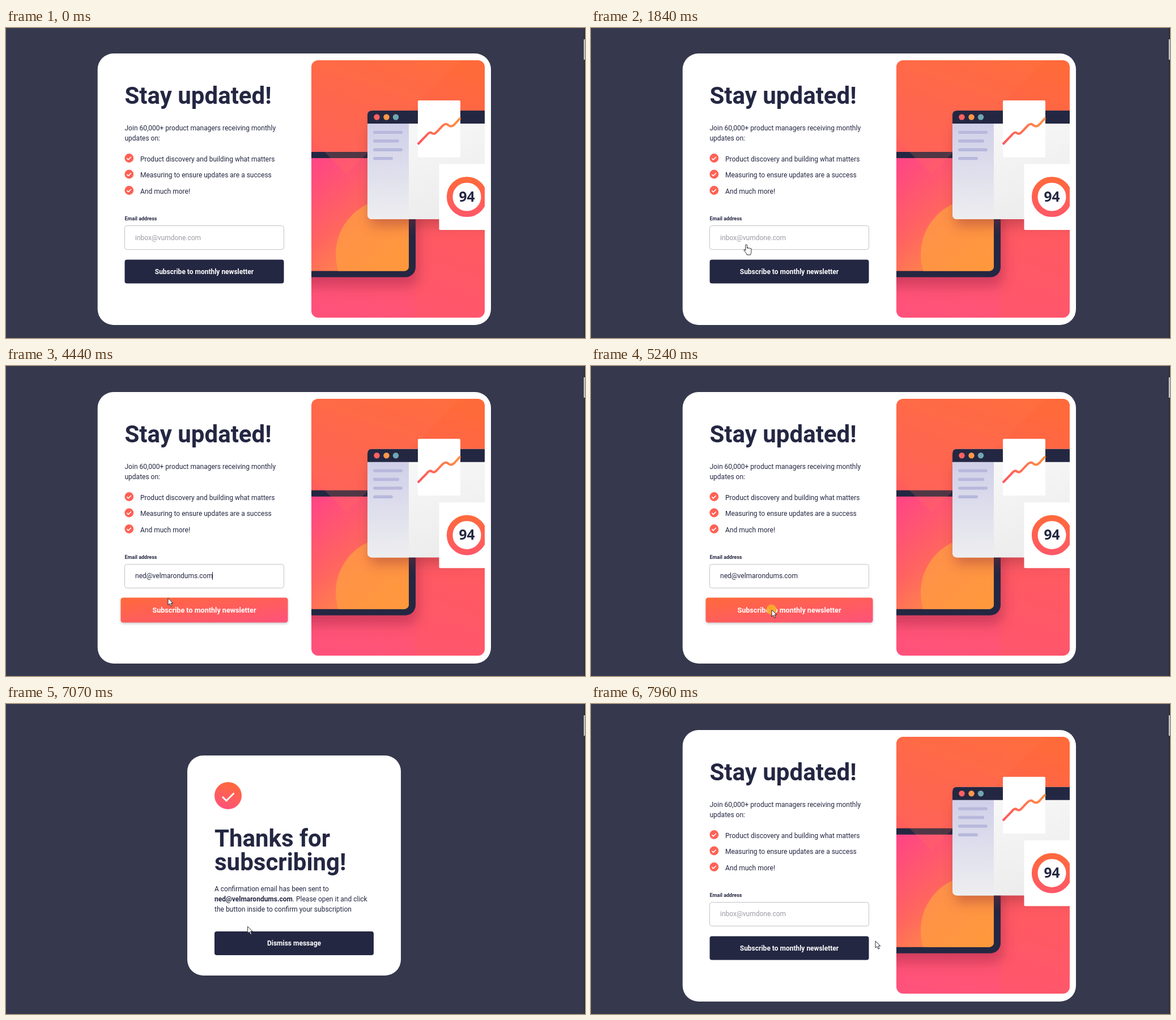
Write an HTML page that moves like this. It is 1022 by 548 pixels and loops after 8 s.

```html
<!DOCTYPE html>
<html lang="en">
<head>
<meta charset="utf-8">
<title>Newsletter sign-up</title>
<style>
  html, body { margin: 0; width: 100%; height: 100%; overflow: hidden; background: #36384d; }
  svg { display: block; width: 1022px; height: 548px; }
  text { font-family: Roboto, sans-serif; font-size: 12px; fill: #242742; white-space: pre; }
  .title { font-size: 42px; font-weight: 700; }
  .label { font-size: 9px; font-weight: 700; }
  .bold { font-weight: 700; }
  .hint { fill: #9b9ba3; }
  .score { font: 700 24.5px "Open Sans", sans-serif; text-anchor: middle; }
  .button text { fill: #fff; font-weight: 700; text-anchor: middle; }
  .button rect { fill: #242742; }
  .button.hover rect { fill: url(#hot); filter: drop-shadow(0 2px 2px #0003); }
</style>
</head>
<body>
<svg id="stage" viewBox="0 0 1022 548" xmlns="http://www.w3.org/2000/svg"></svg>
<script>
const LOOP = 8000;
const HINT = 'inbox@vumdone.com';
const EMAIL = 'ned@velmarondums.com';

const text = (x, y, str, cls = '') => `<text x="${x}" y="${y}" class="${cls}">${str}</text>`;
const rect = (x, y, w, h, fill, r = 0, more = '') =>
  `<rect x="${x}" y="${y}" width="${w}" height="${h}" rx="${r}" fill="${fill}" ${more}/>`;
const circle = (x, y, r, fill, more = '') => `<circle cx="${x}" cy="${y}" r="${r}" fill="${fill}" ${more}/>`;
const grad = (id, [x1, y1, x2, y2], ...colors) =>
  `<linearGradient id="${id}" gradientUnits="userSpaceOnUse" x1="${x1}" y1="${y1}" x2="${x2}" y2="${y2}">` +
  colors.map((c, i) => `<stop offset="${i / (colors.length - 1)}" stop-color="${c}"/>`).join('') +
  '</linearGradient>';
const tick = (x, y, s, width) =>
  `<path d="M${x - 10 * s} ${y + s}l${7 * s} ${7 * s}l${13.5 * s} ${-13.5 * s}" fill="none" stroke="#fff" stroke-width="${width}"/>`;
const button = (id, x, y, label) =>
  `<g id="${id}" class="button">${rect(x, y, 281, 42, '', 4)}${text(x + 140.5, y + 25, label)}</g>`;

const defs = `<defs>
  ${grad('backdrop', [600, 512, 760, 57], '#ff527b', '#ff5c5e', '#ff6a3a')}
  ${grad('screen', [545, 235, 690, 400], '#ff4684', '#ff6460', '#ff9540')}
  ${grad('sun', [600, 330, 690, 430], '#ff914a', '#ff983c')}
  ${grad('side', [0, 169, 0, 338], '#cfcfe9', '#eeeef0')}
  ${grad('page', [720, 169, 780, 338], '#f7f7f7', '#ececec')}
  ${grad('trend', [727, 0, 802, 0], '#ff5660', '#ff9040')}
  ${grad('ring', [0, 263, 0, 334], '#ff6a3a', '#ff5768')}
  ${grad('badge', [400, 138, 384, 186], '#ff6a3a', '#ff527b')}
  <linearGradient id="hot" x1="0" y1="0" x2="1" y2="1">
    <stop stop-color="#ff6a3a"/><stop offset="1" stop-color="#ff527b"/>
  </linearGradient>
  <filter id="blur" x="-30%" y="-30%" width="160%" height="160%"><feGaussianBlur stdDeviation="11"/></filter>
  <clipPath id="frame">${rect(539, 57, 306, 455, '#000', 12)}</clipPath>
  <clipPath id="glass">${rect(520, 230, 191, 199.5, '#000', 8)}</clipPath>
</defs>`;

const tablet = `
  ${rect(500, 250, 228, 207, '#a5284a', 20, 'opacity=".5" filter="url(#blur)"')}
  ${rect(500, 219, 223, 221.5, '#242742', 18)}
  <g clip-path="url(#glass)">
    ${rect(520, 230, 191, 200, 'url(#screen)')}
    ${circle(680, 400, 98, 'url(#sun)')}
  </g>
  <path d="M539 57V196L601 258L802 57Z" fill="#ff7a50" opacity=".2"/>`;

const bars = [52, 46, 52, 35].map((w, i) => rect(648, 181.7 + i * 15.4, w, 5.4, '#b7b8dc', 2.7)).join('');
const browser = `
  ${rect(642, 170, 230, 180, '#8c2a38', 10, 'opacity=".4" filter="url(#blur)"')}
  ${rect(638, 146, 240, 192, 'url(#page)', 8)}
  <path d="M638 169H711V338H646Q638 338 638 330Z" fill="url(#side)"/>
  <path d="M638 169V154Q638 146 646 146H850V169Z" fill="#242742"/>
  ${circle(654.5, 157.5, 5.2, '#ff6160')}${circle(671.5, 157.5, 5.2, '#ff974a')}${circle(688, 157.5, 5.2, '#70a6b2')}
  ${bars}`;

const cards = `
  ${rect(727, 128, 75, 100.5, '#fff', 2)}
  <path d="M727 205.5L742 190Q748 182 752 186Q756 189 761 183L770 173.5Q776 167 781 172Q786 176 791 171L802 159"
    fill="none" stroke="url(#trend)" stroke-width="4"/>
  ${rect(764.5, 240.5, 90, 116.5, '#fff', 2)}
  ${circle(813.5, 298.5, 30.3, 'none', 'stroke="url(#ring)" stroke-width="10.6"')}
  ${text(813.5, 307, '94', 'score')}`;

const picture = `<g id="picture" clip-path="url(#frame)">
  ${rect(539, 57, 306, 455, 'url(#backdrop)')}
  ${rect(722, 366, 150, 170, '#ff5a60', 16, 'opacity=".35"')}
  ${tablet}${browser}${cards}
</g>`;

const points = ['Product discovery and building what matters', 'Measuring to ensure updates are a success', 'And much more!'];
const list = points.map((p, i) => {
  const y = 230 + i * 28.5;
  return circle(217.3, y, 7.9, '#ff6155') + tick(217, y, .36, 1.7) + text(237, Math.round(y + 5.6), p);
}).join('');

const form = `<g id="form">
  <g id="body">
    ${rect(161.7, 45, 694.3, 480, '#fff', 28)}
    ${text(209.5, 134, 'Stay updated!', 'title')}
    ${text(209.5, 181, 'Join 60,000+ product managers receiving monthly')}
    ${text(209.5, 199, 'updates on:')}
    ${list}
    ${text(209.5, 340, 'Email address', 'label')}
    ${rect(209.5, 349.5, 281, 42, '#fff', 4, 'stroke="#c3c3c9"')}
    ${button('send', 209.5, 409.5, 'Subscribe to monthly newsletter')}
  </g>
  ${picture}
  <text id="field" x="228" y="375"></text>
  ${rect(0, 364, 1, 14, '#242742', 0, 'id="caret"')}
</g>`;

const thanks = `<g id="thanks">
  ${rect(320, 91, 377, 389, '#fff', 28)}
  ${circle(392, 162, 24, 'url(#badge)')}${tick(392, 163, 1, 3)}
  ${text(368, 252, 'Thanks for', 'title')}
  ${text(368, 294, 'subscribing!', 'title')}
  ${text(368, 331, 'A confirmation email has been sent to')}
  ${text(368, 349, `<tspan class="bold">${EMAIL}</tspan>. Please open it and click`)}
  ${text(368, 367, 'the button inside to confirm your subscription')}
  ${button('dismiss', 368, 402, 'Dismiss message')}
</g>`;

const pointer = `<g id="pointer" stroke="#15151c" stroke-width=".9" stroke-linejoin="round" fill="#fff">
  ${circle(-.5, -.5, 9, '#fbab2c', 'id="press" stroke="none" opacity=".9"')}
  <path id="arrow" d="M0 0V12L2.9 9.5L5 14.2L7 13.3L5 8.8H8.8Z"/>
  <path id="hand" d="M-1.3 10.5V1.2a1.4 1.4 0 0 1 2.8 0V6.5a1.3 1.3 0 0 1 2.6.3a1.3 1.3 0 0 1 2.5.4a1.2 1.2 0 0 1 2.3.6V12.5Q8.9 15 7.8 16.5V18H1V16.3Q-1 14-3.8 10.4Q-4.6 8.7-3 8.5Q-2 8.6-1.3 10.5Z"/>
</g>`;

const scrollbar = rect(1020, 0, 2, 548, '#2b2c36') + rect(1020, 20, 1.5, 36, '#fff');

const stage = document.getElementById('stage');
stage.innerHTML = defs + rect(0, 0, 1022, 548, '#36384d') + form + thanks + scrollbar + pointer;
const $ = id => document.getElementById(id);
const show = (id, on) => $(id).setAttribute('visibility', on ? 'inherit' : 'hidden');

// pointer moves: start, end, steps, x, y
const MOVES = [
  [130, 880, 12, 845, 457],
  [950, 1700, 12, 276, 384],
  [1770, 1840, 2, 274, 383],
  [1910, 2260, 6, 254, 388],
  [2580, 2720, 3, 253, 390],
  [4100, 4830, 12, 319, 431],
  [5450, 5980, 9, 316, 395],
  [6060, 6850, 12, 397, 385],
  [6920, 7420, 9, 511, 417],
  [7960, 7960, 1, 502, 419]
];
const PRESSES = [2190, 5240, 7820];
const SHIFT = 2260, PASTE = 3380, SENT = 5380, BACK = 7960;
const within = (t, a, b) => t >= a && t < b;
const inside = ([x, y], l, top, w, h) => within(x, l, l + w) && within(y, top, top + h);

function pointerAt(t) {
  let x = 986, y = 523;
  for (const [a, b, n, tx, ty] of MOVES) {
    if (t < a) break;
    const k = Math.floor((t - a) / (b - a || 1) * (n - 1)) + 1;
    const p = Math.min(1, k / n), e = p * p * (3 - 2 * p);
    x += (tx - x) * e;
    y += (ty - y) * e;
  }
  return [x, y];
}

function setHover(id, on, cx, cy) {
  $(id).classList.toggle('hover', on);
  $(id).setAttribute('transform', on ? `translate(${cx} ${cy}) scale(1.05) translate(${-cx} ${-cy})` : '');
}

function draw(t) {
  const at = pointerAt(t), visible = t >= 130;
  const sent = within(t, SENT, BACK), filled = within(t, PASTE, BACK), moved = t >= SHIFT;

  show('form', !sent);
  show('thanks', sent);
  $('body').setAttribute('transform', moved ? 'translate(0 1)' : '');
  $('picture').setAttribute('transform', moved ? `translate(0 512) scale(1 ${454 / 455}) translate(0 -512)` : '');

  $('field').textContent = filled ? EMAIL : HINT;
  $('field').setAttribute('class', filled ? '' : 'hint');
  $('caret').setAttribute('x', filled ? 364 : 228);
  show('caret', within(t, SHIFT, 2790) || within(t, PASTE, 3840) || within(t, 4370, 4900));
  if (sent) show('caret', false);

  const onSend = visible && !sent && inside(at, 209.5, 410, 281, 42);
  const onDismiss = sent && inside(at, 368, 402, 281, 42);
  const onField = !sent && inside(at, 209.5, 350, 281, 42);
  setHover('send', onSend, 350, 430.5);
  setHover('dismiss', onDismiss, 508.5, 423);

  show('pointer', visible);
  $('pointer').setAttribute('transform', `translate(${at[0].toFixed(1)} ${at[1].toFixed(1)})`);
  show('hand', visible && (onField || onDismiss));
  show('arrow', visible && !(onField || onDismiss));
  show('press', PRESSES.some(p => within(t, p, p + 140)));
}

const start = performance.now();
function tickFrame() {
  draw((performance.now() - start) % LOOP);
  requestAnimationFrame(tickFrame);
}
tickFrame();
</script>
</body>
</html>
```
